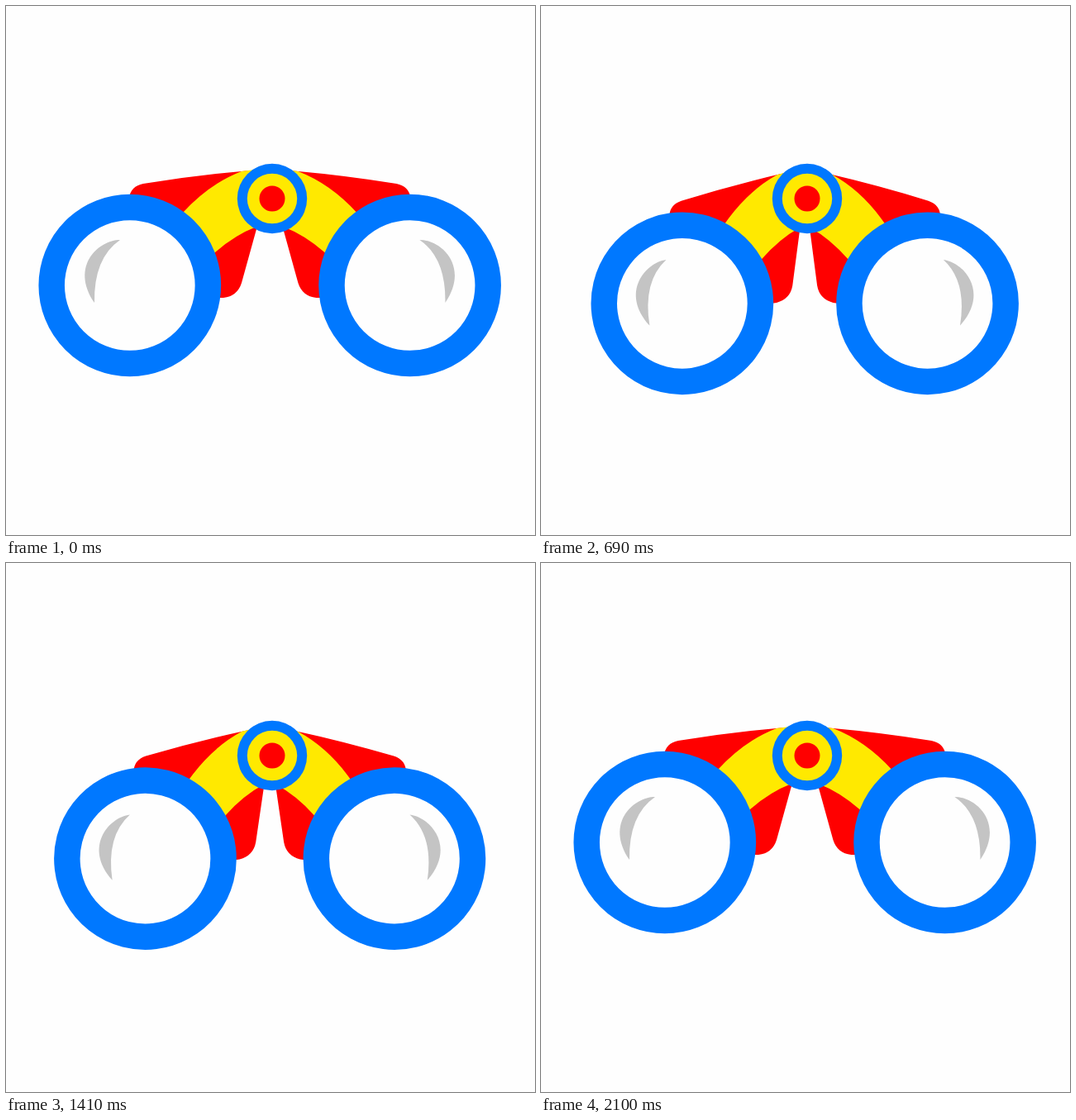
Write an HTML page that moves like this. It is 640x640 px and loops after 2.13 s.

```html
<!DOCTYPE html>
<html lang="en">
<head>
<meta charset="utf-8">
<title>Binoculars</title>
<style>
  html, body { margin: 0; height: 100%; overflow: hidden; background: #fefefe; }
  svg { display: block; width: 100vw; height: 100vh; }
</style>
</head>
<body>
<svg viewBox="0 0 640 640">
  <defs>
    <g id="half">
      <path fill="#f00" d="M149 245V232Q151 218 166 215Q228 205 290 199.5L305 199L310 245L303 270L285 335Q280 351 263 353H235Z"/>
      <path fill="#ffe900" d="M200 266L214 250Q246 215 285 200L301 198L315 233L303 267Q277 277 253 298L235 315Z"/>
      <circle cx="149.8" cy="338" r="94.6" fill="#fefefe" stroke="#0078ff" stroke-width="31.5"/>
      <path fill="#c4c4c4" d="M138 283C112 283 77 315 107 359Q106 305 138 283Z"/>
    </g>
  </defs>
  <use class="side" href="#half"/>
  <g transform="translate(638.4) scale(-1 1)"><use class="side" href="#half"/></g>
  <circle cx="322" cy="233" r="42.2" fill="#0078ff"/>
  <circle cx="322" cy="233" r="30.2" fill="#ffe900"/>
  <circle cx="322" cy="233" r="15.5" fill="#f00"/>
</svg>
<script>
  const LOOP = 2130, STEP = 30, SWING = 11.8;
  // [time in ms, share of the swing]
  const keys = [[0, 0], [400, 1.08], [637, .645], [900, 1], [1080, .835],
                [1170, .775], [1620, .46], [2100, 0], [LOOP, 0]];
  const sides = document.querySelectorAll('.side');

  function swingAt(t) {
    const i = keys.findIndex(k => k[0] > t);
    const [t0, a] = keys[i - 1], [t1, b] = keys[i];
    let p = (t - t0) / (t1 - t0);
    if (t < 900) p = (1 - Math.cos(Math.PI * p)) / 2; // eased swings, then a steady return
    return a + (b - a) * p;
  }

  function draw(now) {
    const t = Math.floor(now % LOOP / STEP) * STEP;
    const turn = `rotate(${-SWING * swingAt(t)} 316 198.7)`;
    sides.forEach(s => s.setAttribute('transform', turn));
    requestAnimationFrame(draw);
  }
  draw(0);
</script>
</body>
</html>
```
